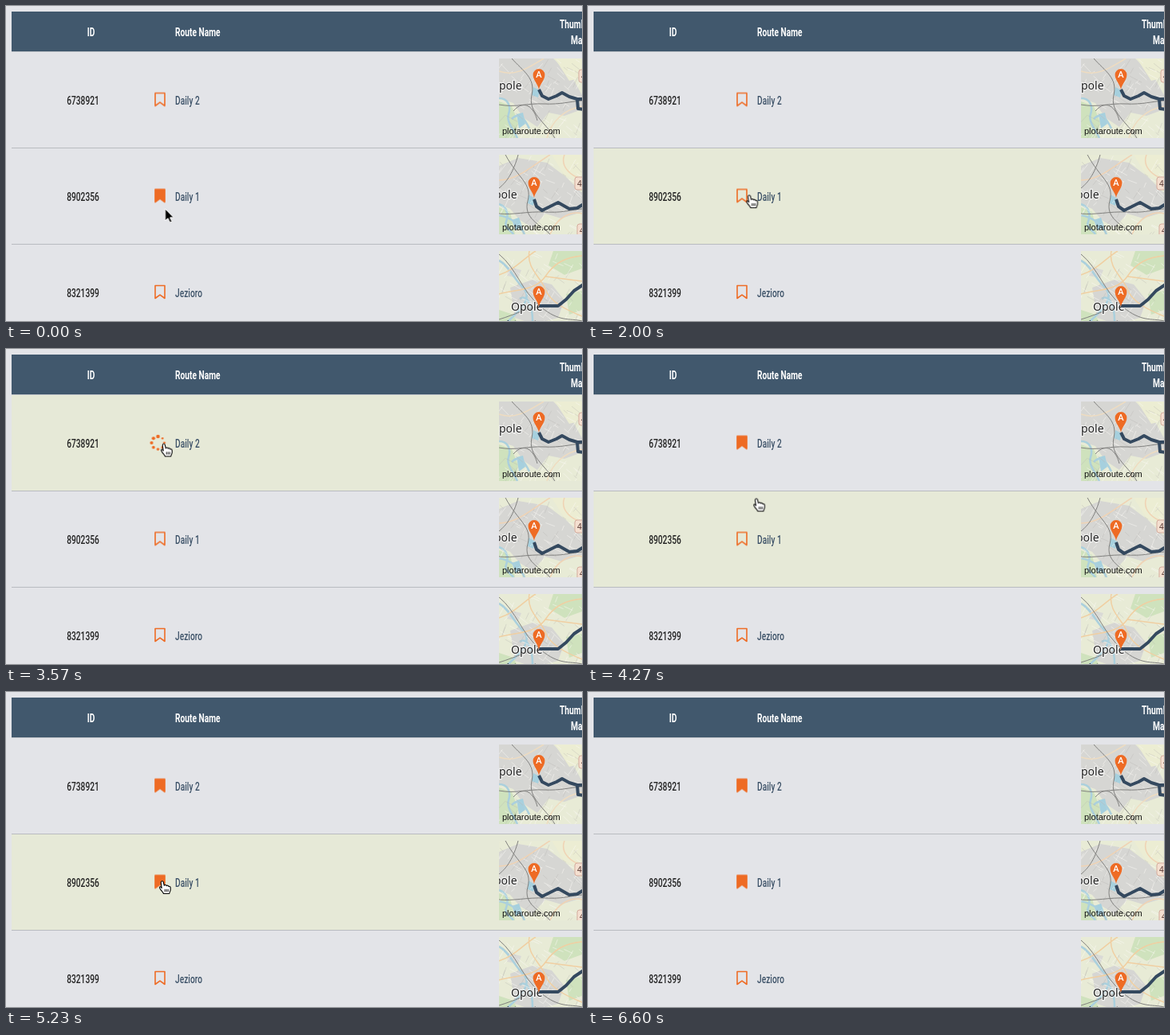
These frames come from a looping animation (722x396 px, 6.63 s). An HTML page:

```html
<!DOCTYPE html>
<html lang="en">
<head>
<meta charset="utf-8">
<title>Route list</title>
<style>
html, body { margin: 0; width: 100%; height: 100%; overflow: hidden; background: #e3e4e8; }
#stage { display: block; width: 722px; height: 396px; }

/* One condensed face for the whole table */
.cond text { font: 500 15.5px Roboto, "Liberation Sans", sans-serif; }
.head text { font-weight: 700; }
.place { font: 14px "Noto Sans", "Open Sans", sans-serif; fill: #222; stroke: #fff; stroke-opacity: .65; stroke-width: 2.5; paint-order: stroke; }
.credit { font: 11px "Liberation Sans", Arial, sans-serif; fill: #111; }
.sign { font: 10px "Noto Sans", sans-serif; fill: #5b3b35; }
.pin { font: 600 11px "Open Sans", "Noto Sans", sans-serif; fill: #fff; text-anchor: middle; }

.loop { animation: 6630ms step-end infinite; }
.hover { fill: #e6e9d7; opacity: 0; }
.spinner { opacity: 0; }
#hover0 { animation-name: hover0; }
#hover1 { animation-name: hover1; }
#hover2 { animation-name: hover2; }
#open0 { animation-name: open0; }
#load0 { animation-name: load0; }
#full0 { animation-name: full0; }
#open1 { animation-name: open1; }
#load1 { animation-name: load1; }
#full1 { animation-name: full1; }
#open2 { opacity: 1; }
#load2, #full2 { opacity: 0; }
#arrow { animation-name: arrow; }
#hand { animation-name: hand; }
#cursor { animation: move 6630ms linear infinite; }
.spin { animation: spin 2210ms linear infinite; }

@keyframes hover0 { 0% { opacity: 0 } 46.3% { opacity: 1 } 63.6%, 100% { opacity: 0 } }
@keyframes hover1 { 0% { opacity: 0 } 21.42% { opacity: 1 } 46.3% { opacity: 0 } 63.6% { opacity: 1 } 84.8%, 100% { opacity: 0 } }
@keyframes hover2 { 0% { opacity: 0 } 84.8% { opacity: 1 } 90.3%, 100% { opacity: 0 } }

@keyframes open0 { 0% { opacity: 1 } 51.28%, 100% { opacity: 0 } }
@keyframes load0 { 0% { opacity: 0 } 51.28% { opacity: 1 } 55.81%, 100% { opacity: 0 } }
@keyframes full0 { 0% { opacity: 0 } 55.81%, 100% { opacity: 1 } }

@keyframes open1 { 0% { opacity: 0 } 27.15% { opacity: 1 } 72.4%, 100% { opacity: 0 } }
@keyframes load1 { 0% { opacity: 0 } 22.62% { opacity: 1 } 27.15% { opacity: 0 } 72.4% { opacity: 1 } 76.92%, 100% { opacity: 0 } }
@keyframes full1 { 0% { opacity: 1 } 22.62% { opacity: 0 } 76.92%, 100% { opacity: 1 } }

@keyframes arrow { 0% { opacity: 1 } 21.42%, 100% { opacity: 0 } }
@keyframes hand { 0% { opacity: 0 } 21.42%, 100% { opacity: 1 } }
@keyframes move {
  0% { transform: translate(199.5px, 255px); animation-timing-function: ease-in-out }
  17%, 27.15% { transform: translate(194.5px, 233px); animation-timing-function: ease-in-out }
  38%, 42.23% { transform: translate(249px, 265px); animation-timing-function: ease-in-out }
  49.77%, 58.52% { transform: translate(199px, 119.5px) }
  67.42% { transform: translate(219px, 223.5px); animation-timing-function: ease-out }
  70.59%, 79.94% { transform: translate(197px, 238px) }
  84.92% { transform: translate(363px, 300.5px) }
  90.5%, 100% { transform: translate(500px, 402px) }
}
@keyframes spin { from { transform: rotate(-221.5deg) } to { transform: rotate(138.5deg) } }
</style>
</head>
<body>
<svg id="stage" viewBox="0 0 722 396" xmlns="http://www.w3.org/2000/svg"></svg>
<script>
const ORANGE = '#ee6b24', NAVY = '#3d5268';

function random(seed) {
  return () => (seed = seed * 16807 % 2147483647) / 2147483647;
}

const path = (d, color, width) =>
  `<path d="${d}" fill="none" stroke="${color}" stroke-width="${width}" stroke-linejoin="round"/>`;
const area = (d, color) => `<path d="${d}" fill="${color}"/>`;

// Condensed table text; x and y are stage pixels
const label = (x, y, text, color, anchor = 'start') =>
  `<g class="cond" transform="translate(${x} ${y}) scale(.66 1)"><text fill="${color}" text-anchor="${anchor}">${text}</text></g>`;

function streets(seed, count) {
  const rnd = random(seed);
  let light = '', dark = '';
  for (let i = 0; i < count; i++) {
    const x = rnd() * 104, y = rnd() * 100, a = (rnd() < .5 ? .35 : 1.9) + rnd() * .5;
    const len = 5 + rnd() * 13, dx = Math.cos(a) * len, dy = Math.sin(a) * len;
    const line = `M${x.toFixed(1)} ${y.toFixed(1)}l${dx.toFixed(1)} ${dy.toFixed(1)}`;
    if (i % 3) light += line; else dark += line;
  }
  return path(dark, '#b5b3ae80', .7) + path(light, '#fbfaf590', .9);
}

function pin(x, y) {
  return `<g transform="translate(${x} ${y})">
    <path d="M0 0C-1-7-7.4-12-7.4-18.6A7.4 7.4 0 0 1 7.4-18.6C7.4-12 1-7 0 0Z" fill="${ORANGE}"/>
    <text class="pin" y="-14.7">A</text></g>`;
}

const sign = (x, y) =>
  `<rect x="${x}" y="${y}" width="18" height="16" rx="3" fill="#f4dfd0" stroke="#d4ab9c"/>
   <text class="sign" x="${x + 3}" y="${y + 12}">4</text>`;

const CITY = '#d6d6d3', GREEN = '#cfe2bd', CREAM = '#ecedd3', LAKE = '#a6d0de';

const maps = [
  {
    seed: 71, count: 100, place: ['pole', 0, 39], pin: [50, 39],
    land: area('M0 0H68L92 24 104 46V64L82 72 62 68 48 86 30 74 18 56 0 50Z', CITY)
      + area('M70 0H104V24L88 28Z', CREAM) + area('M0 54L16 60 24 80 20 100H0Z', GREEN)
      + area('M22 70L30 68 33 82 25 88Z', LAKE) + area('M43 36L51 40 49 49 41 46Z', LAKE),
    river: 'M0 50C12 50 15 61 12 70S17 88 23 100M16 76C26 66 32 76 38 88',
    roads: 'M0 16C22 24 42 8 56 0M60 100C66 78 82 64 104 60', roadColor: '#efdcc0',
    rails: 'M16 0C30 16 46 24 41 46S58 80 70 100M0 58C22 62 34 56 56 57S88 54 104 53M18 66C32 50 44 62 48 78',
    route: 'M50 39L54 47 62 51 72 47 79 43 88 48 98 51H106M98 51L99 63 106 64',
    signs: sign(100, 14)
  },
  {
    seed: 137, count: 100, place: ['pole', -6, 55], pin: [44, 54],
    land: area('M0 14L24 4 60 10 84 28 104 48V72L78 80 58 74 42 92 26 82 14 68 0 62Z', CITY)
      + area('M66 0H104V34L82 26Z', CREAM) + area('M0 66L14 72 20 100H0Z', GREEN)
      + area('M16 82L25 79 29 90 21 95Z', LAKE) + area('M37 50L45 55 43 64 36 61Z', LAKE),
    river: 'M0 62C11 66 12 76 9 84S14 94 18 100M0 76C10 78 24 83 32 100',
    roads: 'M0 32C24 32 44 12 64 0M64 100C72 78 92 70 104 74M82 0C76 16 92 28 104 30', roadColor: '#f0d3b4',
    rails: 'M8 0C24 30 42 36 36 58S52 88 64 100M0 74C18 76 34 71 58 72S84 70 104 68M24 0C18 22 10 34 0 42',
    route: 'M44 56L47 65 54 70 64 65 74 60 88 68 98 67 106 62',
    signs: sign(95, 28) + sign(98, 87)
  },
  {
    seed: 53, count: 90, place: ['Opole', 15, 75], pin: [50, 70],
    land: area('M14 46L42 36 66 42 82 62 74 84 44 92 20 84Z', CITY)
      + area('M68 0H104V22L82 30 62 18Z', GREEN) + area('M0 74L18 80 28 100H0Z', GREEN)
      + area('M84 54L104 50V74L88 80Z', GREEN) + area('M12 20L28 24 24 34 10 31Z', '#dadad6'),
    river: 'M0 12C12 18 18 34 30 46S28 72 20 80 8 90 4 100M26 60C35 54 42 68 42 88',
    roads: 'M0 54C22 48 46 50 58 32S84 8 104 6M38 0C34 22 52 32 58 48S84 74 104 82M0 30C20 24 32 8 46 0M58 32L104 38', roadColor: '#f0cfa2',
    rails: 'M0 4C22 22 28 50 52 70S88 84 104 88M0 86C20 80 34 72 52 70',
    route: 'M50 69H74L84 61 94 50 106 42',
    signs: ''
  }
];

function drawMap(m, y) {
  const [text, tx, ty] = m.place;
  return `<svg x="618" y="${y}" width="104" height="100">
    <rect width="104" height="100" fill="#e8ebd6"/>
    ${m.land}${path(m.river, '#abd0dd', 2.6)}${streets(m.seed, m.count)}
    ${path(m.roads, m.roadColor, 1.5)}${path(m.rails, '#80807e', 1)}
    <text class="place" x="${tx}" y="${ty}">${text}</text>
    ${path(m.route, '#34495f', 4)}${m.signs}${pin(...m.pin)}
    <text class="credit" x="4" y="95">plotaroute.com</text></svg>`;
}

function spinner() {
  let dots = '';
  for (let i = 0; i < 8; i++) {
    const a = -i * Math.PI / 4, r = 2.3 - i * .14;
    dots += `<circle cx="${(8 * Math.sin(a)).toFixed(2)}" cy="${(-8 * Math.cos(a)).toFixed(2)}" r="${r.toFixed(2)}"/>`;
  }
  return `<g class="spin" fill="${ORANGE}">${dots}</g>`;
}

const mark = 'M187 -8H199V8L193 3.6 187 8Z';

function drawRow([id, name], i) {
  const top = 58 + i * 121, mid = top + 60;
  return `<rect id="hover${i}" class="hover loop" x="7" y="${top}" width="715" height="120"/>
    <rect x="7" y="${top + 120}" width="715" height="1" fill="#b9bbc0"/>
    ${label(96.5, mid + 6, id, '#222', 'middle')}
    ${label(212, mid + 6, name, NAVY)}
    <g transform="translate(0 ${mid - .5})" stroke="${ORANGE}" stroke-width="1.6" stroke-linejoin="round">
      <path id="open${i}" class="loop" d="${mark}" fill="none"/>
      <path id="full${i}" class="loop" d="${mark}" fill="${ORANGE}"/>
    </g>
    <g id="load${i}" class="spinner loop"><g transform="translate(190.5 ${mid})">${spinner()}</g></g>
    ${drawMap(maps[i], top + 8)}`;
}

const rows = [['6738921', 'Daily 2'], ['8902356', 'Daily 1'], ['8321399', 'Jezioro']];

const cursor = `<g id="cursor">
  <path id="arrow" class="loop" d="M0 0V15L3.5 11.8 6 17.2 8.5 16.1 6.1 10.9H10.6Z" fill="#000" stroke="#fff" stroke-width="1"/>
  <g id="hand" class="loop" stroke="#000" stroke-width="1.1" stroke-linejoin="round">
    <path d="M-1.8 8.5L-2.8 1.6C-2.8 -.6 -.2 -.8 .3 1.2L1.3 5.3C1.8 4.2 4 4.2 4.2 5.8 4.6 4.8 6.6 4.9 6.9 6.6 7.5 6 9.2 6.2 9.2 8V10.5C9.2 12.5 7.9 13.5 7.7 15.5H.5C.1 13.8 -1.8 12.4 -3.2 10.4 -4 9.2 -5 8 -4.4 7.1 -3.7 6.2 -2.6 7.2 -1.8 8.5Z" fill="#fff"/>
    <path d="M2.2 9.8V13.2M4.2 9.8V13.2M6.2 9.8V13.2" fill="none" stroke-width=".9"/>
  </g></g>`;

document.getElementById('stage').innerHTML = `
  <rect width="722" height="396" fill="#e3e4e8"/>
  <rect x="7" y="7" width="715" height="50" fill="#41586d"/>
  <rect x="7" y="57" width="715" height="1" fill="#c3c6cb"/>
  <g class="head">
    ${label(106.5, 38, 'ID', '#fff', 'middle')}
    ${label(212, 38, 'Route Name', '#fff')}
    ${label(694, 28, 'Thumbnail', '#fff')}
    ${label(708, 48, 'Map', '#fff')}
  </g>
  ${rows.map(drawRow).join('')}
  ${cursor}`;
</script>
</body>
</html>
```
